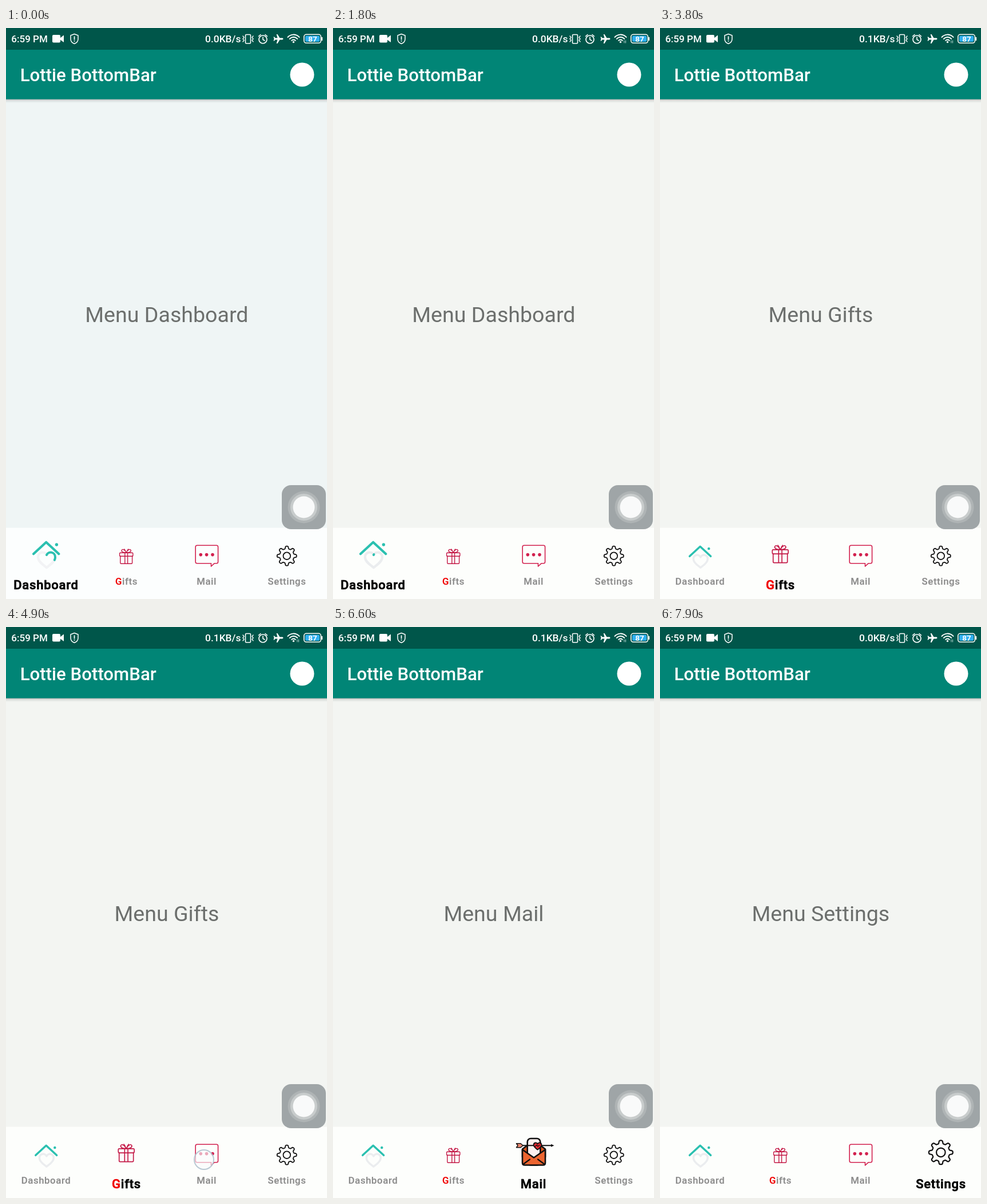
An HTML page with a canvas that plays this animation: 561 by 998 pixels, repeating every 8 s.

```html
<!DOCTYPE html>
<html lang="en">
<head>
<meta charset="utf-8">
<title>Bottom bar</title>
<style>
html, body { margin: 0; width: 100%; height: 100%; overflow: hidden; }
canvas { display: block; width: 561px; height: 998px; }
</style>
</head>
<body>
<canvas id="stage"></canvas>
<script>
const W = 561, H = 998, LOOP = 8000, TAU = Math.PI * 2;
const canvas = document.getElementById('stage');
const c = canvas.getContext('2d');
const dpr = window.devicePixelRatio || 1;
canvas.width = W * dpr;
canvas.height = H * dpr;

const TEAL = '#2bc0b0', CRIMSON = '#d2214f', INK = '#111';
const tabs = [
  { name: 'Dashboard', x: 70, from: 0, to: 2400 },
  { name: 'Gifts', x: 210.5, from: 2400, to: 5000 },
  { name: 'Mail', x: 350.5, from: 5000, to: 6900 },
  { name: 'Settings', x: 491, from: 6900, to: LOOP }
];
const touches = [
  { x: 210, y: 951, from: 2150, to: 2400 },
  { x: 346, y: 931, from: 4850, to: 5000 },
  { x: 490, y: 931, from: 6760, to: 6900 }
];

const clamp = v => Math.max(0, Math.min(1, v));
const ease = v => v * v * (3 - 2 * v);
const ramp = (t, a, b) => ease(clamp((t - a) / (b - a)));
const mix = (a, b, k) => a + (b - a) * k;

function rect(x, y, w, h, color) {
  c.fillStyle = color;
  c.fillRect(x, y, w, h);
}
function paint(fill, line, width) {
  if (fill) { c.fillStyle = fill; c.fill(); }
  if (line) { c.strokeStyle = line; c.lineWidth = width; c.stroke(); }
}
function round(x, y, w, h, r, fill, line, width) {
  c.beginPath();
  c.roundRect(x, y, w, h, r);
  paint(fill, line, width);
}
function disc(x, y, r, fill, line, width) {
  c.beginPath();
  c.arc(x, y, r, 0, TAU);
  paint(fill, line, width);
}
function shape(d, fill, line, width) {
  const p = new Path2D(d);
  if (fill) { c.fillStyle = fill; c.fill(p); }
  if (line) { c.strokeStyle = line; c.lineWidth = width; c.stroke(p); }
}
function text(s, x, y, font, color, align = 'left') {
  c.font = font + ' Roboto, sans-serif';
  c.fillStyle = color;
  c.textAlign = align;
  c.fillText(s, x, y);
}
function at(x, y, scale, draw, turn = 0) {
  c.save();
  c.translate(x, y);
  c.rotate(turn);
  c.scale(scale, scale);
  draw();
  c.restore();
}

function statusBar(t) {
  rect(0, 0, W, 38, '#00564a');
  const w = '#fff';
  text('6:59 PM', 9.3, 25, '500 17px', w);
  text(t > 3000 && t < 7000 ? '0.1KB/s' : '0.0KB/s', 348, 25, '500 17.4px', w);
  // camera, shield
  round(81, 12, 14, 13.5, 2, w);
  shape('M94 18 L101 12.5 V25 L94 20Z', w);
  shape('M119.5 10.5 L126 13 V19 Q126 25 119.5 27.5 Q113 25 113 19 V13Z', null, w, 1.5);
  shape('M119.5 15 V20 M119.5 22.6 V23', null, w, 1.7);
  // vibrate
  round(418.5, 11.5, 9, 15.5, 1.5, null, w, 1.6);
  shape('M414 14 l2 2.5 l-2 2.5 l2 2.5 l-2 2.5 M432 14 l-2 2.5 l2 2.5 l-2 2.5 l2 2.5', null, w, 1.4);
  // alarm
  disc(449, 20, 7, null, w, 1.7);
  shape('M449 16 V20.3 L452 22 M441.5 14.5 L445 11.5 M456.5 14.5 L453 11.5', null, w, 1.6);
  // plane
  shape('M484.5 19 Q484.5 20.4 482.5 20.4 H478.5 L474.5 27 H472.7 L474.5 20.4 H470.5 L469 22.4 H467.5 L468.6 19 L467.5 15.6 H469 L470.5 17.6 H474.5 L472.7 11 H474.5 L478.5 17.6 H482.5 Q484.5 17.6 484.5 19Z', w);
  // wifi
  for (const r of [4.5, 9, 13.5]) {
    c.beginPath();
    c.arc(502.5, 25, r, -Math.PI * .77, -Math.PI * .23);
    paint(null, w, 1.8);
  }
  disc(502.5, 24.5, 1.7, w);
  if (t >= 500) shape('M509 22 V26 M511.5 22 V26', null, '#a9cbc5', 1.1);
  // battery
  round(520.8, 11.3, 29.6, 15, 4, null, w, 1.6);
  round(523, 13.5, 25.2, 10.6, 2, '#2fb0f0');
  rect(551.2, 16, 2, 6, w);
  text('87', 536, 23.8, '700 13.5px', w, 'center');
}

function appBar() {
  const g = c.createLinearGradient(0, 124, 0, 131);
  g.addColorStop(0, 'rgba(0,0,0,.32)');
  g.addColorStop(.35, 'rgba(0,0,0,.1)');
  g.addColorStop(1, 'rgba(0,0,0,0)');
  rect(0, 124, W, 7, g);
  rect(0, 38, W, 86.5, '#018576');
  text('Lottie BottomBar', 24.7, 93, '500 31.2px', '#fff');
  disc(517.5, 81.5, 21, '#fff');
}

function assistButton() {
  round(482, 799, 77, 77, 16, '#9fa5a7');
  disc(520.5, 837.5, 28, '#afb4b5');
  disc(520.5, 837.5, 23.5, '#c8cccc');
  disc(520.5, 837.5, 19, '#f9fafa');
}

const HEART = 'M0 0 C3 -7 15 -6 15 4 C15 12 5 18 0 22 C-5 18 -15 12 -15 4 C-15 -6 -3 -7 0 0';
const HEART_LEN = 86;

function home(k, t) {
  at(70.2, mix(924, 920, k), mix(.83, 1, k), () => {
    c.save();
    c.translate(.8, 1);
    shape(HEART, null, t < 500 ? '#f2f3f5' : '#ebedef', 4.2);
    if (k > .99) {
      const p = ((t - 1780 + 2400) % 2400) / 2400;
      const end = Math.min(1, p * 1.2), start = clamp(p * 6 - 5);
      if (end > start) {
        c.setLineDash([0, start * HEART_LEN, (end - start) * HEART_LEN + .1, HEART_LEN * 2]);
        shape(HEART, null, TEAL, 4);
      }
    }
    c.restore();
    shape('M-22.2 -.8 L0 -21.3 L22.2 -.8', null, TEAL, 4.2);
    disc(18.2, -17, 2.7, TEAL);
  });
}

function gift(k, t) {
  const s = t - 2400;
  const hop = k > 0 && s > 250 && s < 1250 ? Math.abs(Math.sin((s - 250) / 500 * Math.PI)) * 1.5 : 0;
  at(210.2, mix(923.5, 919.3, k), mix(1, 1.2, k), () => {
    const col = '#c41846', lw = 1.4;
    shape('M-10.4 -.5 V11.2 Q-10.4 12.7 -9 12.7 H9 Q10.4 12.7 10.4 11.2 V-.5 M-2.4 0 V12.7 M2.4 0 V12.7', null, col, lw);
    c.translate(0, -hop);
    round(-11.6, -6.2, 23.2, 6, 1.2, null, col, lw);
    shape('M-2.4 -6 V0 M2.4 -6 V0', null, col, lw);
    shape('M0 -6.6 C-4 -6.4 -9 -7.5 -8 -10.8 C-6.5 -14 -2 -11 0 -6.6 C2 -11 6.5 -14 8 -10.8 C9 -7.5 4 -6.4 0 -6.6', null, col, lw);
    shape('M-1.5 -10 L-3.5 -12.8 M1.5 -10 L3.5 -12.8', null, col, 1.2);
  });
}

function chat() {
  shape('M334 904.2 H368 Q370.6 904.2 370.6 907 V933 Q370.6 935.8 368 935.8 H364 L358.5 941 V935.8 H334 Q331.2 935.8 331.2 933 V907 Q331.2 904.2 334 904.2Z', null, CRIMSON, 1.6);
  for (const x of [340.3, 350.6, 361]) disc(x, 920.6, 2.8, CRIMSON);
}

function envelope(k, s) {
  const open = ramp(s, 200, 420), rise = ramp(s, 350, 650);
  const up = ramp(s, 450, 750) - ramp(s, 900, 1150);
  const lift = ramp(s, 1000, 1300), shot = ramp(s, 1300, 1520);
  at(351, 926.5 - 4 * up, mix(.85, 1, k) * (1 + .04 * up), () => {
    const orange = '#ec6530', lw = 2.6;
    const tip = mix(0, -29, open);
    shape(`M-20 -14 L0 ${Math.min(-14, tip)} L20 -14 V0 H-20Z`, '#d9531f', INK, lw);
    const top = mix(-8, -32.5, rise);
    round(-11.3, top, 22.6, 14 - top, 6, '#fdf1f0', INK, 2.6);
    shape('M-20 -13 L0 1 L20 -13 V10 Q20 14 16 14 H-16 Q-20 14 -20 10Z', orange, INK, lw);
    shape('M-18 12 L-7 4 M18 12 L7 4', null, INK, 2.2);
    if (open < .5) shape('M-20 -14 H20 L0 2Z', orange, INK, lw);
    if (shot > 0) {
      c.save();
      c.globalAlpha = clamp(shot * 3);
      c.translate(mix(-22, 0, shot), -20.3);
      shape('M-24 0 H31', null, INK, 2);
      shape('M35.5 0 L30 -2.5 V2.5Z', INK);
      shape('M-30.5 -3.5 H-23 L-19 0 L-23 3.5 H-30.5 L-28 0Z', '#ee8a72', INK, 1.5);
      c.restore();
    }
    at(mix(0, 6.5, lift), mix(-7.5, -23, lift), mix(.38, .46, lift), () => shape(HEART, '#e6262f', INK, 4));
    if (shot > .8) shape('M2 -18.5 L5 -21 L7 -18.8 L10 -21', null, INK, 1.3);
  }, -.03 * up);
}

function gear(k, t) {
  const turn = k > 0 ? Math.PI / 2 * ramp(t, 7000, 7850) : 0;
  at(490.8, mix(922.7, 918.3, k), mix(1, 1.23, k), () => {
    c.beginPath();
    for (let i = 0; i < 192; i++) {
      const a = i / 192 * TAU;
      const r = 14.8 + 2.3 * Math.tanh(2.2 * (Math.cos(8 * a) - .1));
      c.lineTo(r * Math.cos(a), r * Math.sin(a));
    }
    c.closePath();
    paint(null, INK, 1.8);
    disc(0, 0, 6.3, null, INK, 1.8);
  }, turn);
}

function label(tab, k) {
  const size = mix(16.8, 22, k), y = mix(973, 980.5, k);
  const shade = Math.round(mix(140, 0, k));
  const gray = `rgb(${shade},${shade},${shade})`;
  c.font = `500 ${size}px Roboto, sans-serif`;
  c.letterSpacing = size * .035 + 'px';
  c.textAlign = 'left';
  let x = tab.x - c.measureText(tab.name).width / 2;
  const parts = tab.name === 'Gifts' ? [['G', '#f00000'], ['ifts', gray]] : [[tab.name, gray]];
  for (const [s, color] of parts) {
    c.fillStyle = c.strokeStyle = color;
    c.lineWidth = mix(.2, .7, k);
    c.fillText(s, x, y);
    c.strokeText(s, x, y);
    x += c.measureText(s).width;
  }
  c.letterSpacing = '0px';
}

function selection(tab, t) {
  const rise = tab.from ? ramp(t, tab.from, tab.from + 220) : 1;
  return rise * (1 - ramp(t, tab.to, tab.to + 220));
}

function draw(t) {
  c.setTransform(dpr, 0, 0, dpr, 0, 0);
  c.lineCap = c.lineJoin = 'round';
  rect(0, 0, W, H, t < 500 ? '#eff5f5' : '#f3f5f2');
  appBar();
  statusBar(t);
  const current = tabs.find(tab => t < tab.to);
  text('Menu ' + current.name, W / 2 + .4, 513.6, '400 37.6px', '#6c6f6d', 'center');

  rect(0, 873.5, W, H - 873.5, t < 500 ? '#fcfefe' : '#fdfefc');
  const k = tabs.map(tab => selection(tab, t));
  home(k[0], t);
  gift(k[1], t);
  if (current.name === 'Mail') envelope(k[2], t - current.from);
  else chat();
  gear(k[3], t);
  tabs.forEach((tab, i) => label(tab, k[i]));

  for (const p of touches) {
    if (t >= p.from && t < p.to) disc(p.x, p.y, 17, 'rgba(250,252,253,.62)', 'rgba(174,192,205,.85)', 2);
  }
  assistButton();
}

function frame() {
  draw(performance.now() % LOOP);
  requestAnimationFrame(frame);
}
frame();
</script>
</body>
</html>
```
